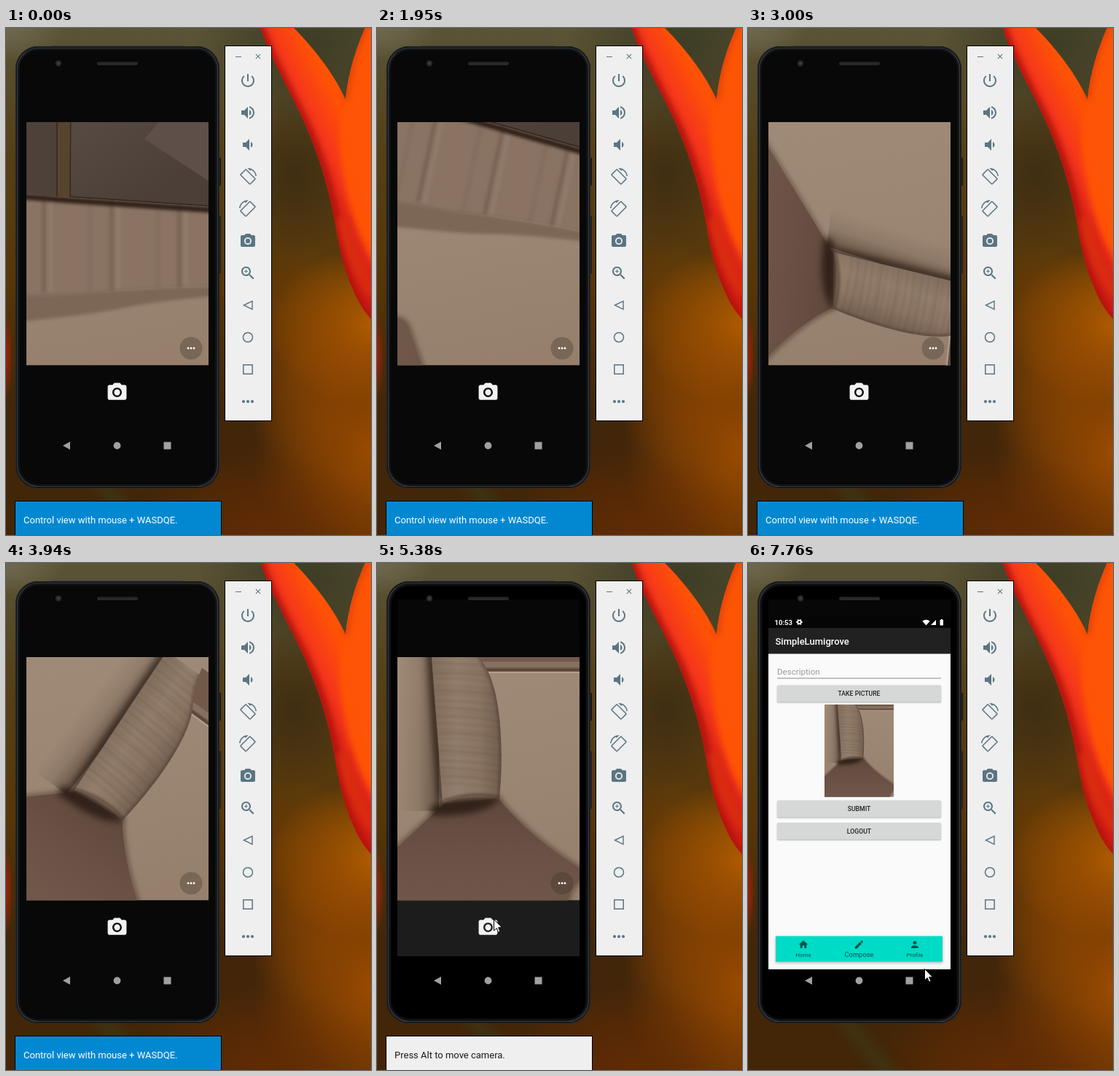
An HTML page with a canvas for the animation above (8 s loop, 501 by 695 pixels).

```html
<!DOCTYPE html>
<html lang="en">
<head>
<meta charset="utf-8">
<title>Emulator camera</title>
<style>
html, body { margin: 0; width: 100%; height: 100%; overflow: hidden; background: #3a2a10; }
canvas { display: block; }
</style>
</head>
<body>
<canvas id="stage" width="501" height="695"></canvas>
<script>
const W = 501, H = 695, LOOP = 8000, STEP = 130;
const VIEW = { x: 28, y: 129, w: 250, h: 333.5 };
const ALT_OFF = 4680, SHUTTER = 5670, CAPTURED = 5850, REVIEW = 6110, APP = 7000;
const main = document.getElementById('stage').getContext('2d');
let ctx = main;

const ICON = {
  power: 'M13 3h-2v10h2V3zm4.83 2.17l-1.42 1.42C17.99 7.86 19 9.81 19 12c0 3.87-3.13 7-7 7s-7-3.13-7-7c0-2.19 1.01-4.14 2.58-5.42L6.17 5.17C4.23 6.82 3 9.26 3 12c0 4.97 4.03 9 9 9s9-4.03 9-9c0-2.74-1.23-5.18-3.17-6.83z',
  louder: 'M3 9v6h4l5 5V4L7 9H3zm13.5 3c0-1.77-1.02-3.29-2.5-4.03v8.05c1.48-.73 2.5-2.25 2.5-4.02zM14 3.23v2.06c2.89.86 5 3.54 5 6.71s-2.11 5.85-5 6.71v2.06c4.01-.91 7-4.49 7-8.77s-2.99-7.86-7-8.77z',
  quieter: 'M18.5 12c0-1.77-1.02-3.29-2.5-4.03v8.05c1.48-.73 2.5-2.25 2.5-4.02zM5 9v6h4l5 5V4L9 9H5z',
  rotate: 'M16.48 2.52c3.27 1.55 5.61 4.72 5.97 8.48h1.5C23.44 4.84 18.29 0 12 0l-.66.03 3.81 3.81 1.33-1.32zm-6.25-.77c-.59-.59-1.54-.59-2.12 0L1.75 8.11c-.59.59-.59 1.54 0 2.12l12.02 12.02c.59.59 1.54.59 2.12 0l6.36-6.36c.59-.59.59-1.54 0-2.12L10.23 1.75zm4.6 19.44L2.81 9.17l6.36-6.36 12.02 12.02-6.36 6.36z',
  camera: 'M12 8.8a3.2 3.2 0 1 0 0 6.4a3.2 3.2 0 1 0 0-6.4zM9 2L7.17 4H4c-1.1 0-2 .9-2 2v12c0 1.1.9 2 2 2h16c1.1 0 2-.9 2-2V6c0-1.1-.9-2-2-2h-3.17L15 2H9zm3 15c-2.76 0-5-2.24-5-5s2.24-5 5-5 5 2.24 5 5-2.24 5-5 5z',
  zoom: 'M15.5 14h-.79l-.28-.27C15.41 12.59 16 11.11 16 9.5 16 5.91 13.09 3 9.5 3S3 5.91 3 9.5 5.91 16 9.5 16c1.61 0 3.09-.59 4.23-1.57l.27.28v.79l5 4.99L20.49 19l-4.99-5zm-6 0C7.01 14 5 11.99 5 9.5S7.01 5 9.5 5 14 7.01 14 9.5 11.99 14 9.5 14zM12 10h-2v2H9v-2H7V9h2V7h1v2h2v1z',
  home: 'M10 20v-6h4v6h5v-8h3L12 3 2 12h3v8z',
  edit: 'M3 17.25V21h3.75L17.81 9.94l-3.75-3.75L3 17.25zM20.71 7.04c.39-.39.39-1.02 0-1.41l-2.34-2.34c-.39-.39-1.02-.39-1.41 0l-1.83 1.83 3.75 3.75 1.83-1.83z',
  person: 'M12 12c2.21 0 4-1.79 4-4s-1.79-4-4-4-4 1.79-4 4 1.79 4 4 4zm0 2c-2.67 0-8 1.34-8 4v2h16v-2c0-2.66-5.33-4-8-4z',
  undo: 'M8 4L3 9l5 5v-4h7c2 0 3.5 1.3 3.5 3.2S17 16.500 15 16.500H6v2h9c3.300 0 5.500-2.300 5.500-5.300S18.300 8 15 8H8z',
  check: 'M9 16.17L4.83 12l-1.42 1.41L9 19 21 7l-1.41-1.41z',
  close: 'M19 6.41L17.59 5 12 10.59 6.41 5 5 6.41 10.59 12 5 17.59 6.41 19 12 13.41 17.59 19 19 17.59 13.41 12z'
};
for (const k in ICON) ICON[k] = new Path2D(ICON[k]);

// ---- helpers ----
const mix = (a, b, f) => a + (b - a) * f;

// Interpolates every field of a list of timed keys.
function track(keys, t) {
  const i = Math.max(0, keys.findLastIndex(k => k.t <= t));
  const a = keys[i], b = keys[i + 1] || a;
  const f = a === b ? 0 : ((t - a.t) / (b.t - a.t)) ** (a.ease || 1);
  return Object.fromEntries(Object.keys(a).map(k => [k, mix(a[k], b[k], f)]));
}
function icon(name, x, y, size, color, flip = 1) {
  ctx.save();
  ctx.translate(x, y);
  ctx.scale(flip * size / 24, size / 24);
  ctx.translate(-12, -12);
  ctx.fillStyle = color;
  ctx.fill(ICON[name], 'evenodd');
  ctx.restore();
}
function rect(x, y, w, h, color) { ctx.fillStyle = color; ctx.fillRect(x, y, w, h); }
function box(x, y, w, h, r, fill) { ctx.beginPath(); ctx.roundRect(x, y, w, h, r); ctx.fillStyle = fill; ctx.fill(); }
function disc(x, y, r, color) {
  ctx.fillStyle = color;
  ctx.beginPath(); ctx.arc(x, y, r, 0, 7); ctx.fill();
}
function dots(x, y, gap, r, color) { for (const d of [-gap, 0, gap]) disc(x + d, y, r, color); }
function fill(path, color) { ctx.fillStyle = color; ctx.fill(new Path2D(path)); }
function stroke(path, color, width) {
  ctx.strokeStyle = color; ctx.lineWidth = width;
  ctx.stroke(new Path2D(path));
}
function text(s, x, y, size, color, weight = 400, align = 'left') {
  ctx.font = `${weight} ${size}px Roboto, sans-serif`;
  ctx.textAlign = align;
  ctx.fillStyle = color;
  ctx.fillText(s, x, y);
}
function ramp(x0, y0, x1, y1, ...stops) {
  const g = ctx.createLinearGradient(x0, y0, x1, y1);
  stops.forEach((c, i) => g.addColorStop(i / (stops.length - 1), c));
  return g;
}
function glow(x, y, rx, ry, rgb, alpha) {
  ctx.save();
  ctx.translate(x, y); ctx.scale(rx, ry);
  const g = ctx.createRadialGradient(0, 0, 0, 0, 0, 1);
  [1, .6, 0].forEach((a, i) => g.addColorStop(i / 2, `rgba(${rgb},${alpha * a})`));
  rect(-1, -1, 2, 2, g);
  ctx.restore();
}
// Runs a drawing in its own state, optionally blurred or casting a shadow.
function layer(draw, { blur = 0, shadow, drop = 0, clip } = {}) {
  ctx.save();
  if (clip) ctx.clip(clip);
  if (shadow) { ctx.shadowColor = 'rgba(0,0,0,.3)'; ctx.shadowBlur = shadow; ctx.shadowOffsetY = drop; }
  if (blur) ctx.filter = `blur(${blur}px)`;
  draw();
  ctx.restore();
}

// ---- desktop ----
function wallpaper() {
  rect(0, 0, W, H, ramp(0, 0, 0, H, '#5a5438', '#553f16', '#573608', '#42260a', '#432607'));
  glow(0, 0, 80, 45, '125,118,95', .6);
  glow(420, 20, 160, 130, '60,60,36', .95);
  glow(395, 200, 90, 110, '58,42,18', .8);
  glow(0, 450, 9, 60, '165,32,8', .9);
  glow(500, 410, 140, 110, '184,96,0', .95);
  glow(410, 450, 90, 160, '140,70,0', .6);
  glow(500, 580, 160, 210, '158,76,0', .95);
  glow(350, 690, 170, 110, '104,44,4', .8);
  layer(() => stroke('M120 610L205 715', 'rgba(62,56,24,.7)', 22), { blur: 8 });

  const petal = 'M348 -5C360 36 385 78 402 114C426 162 444 220 452 270C458 308 466 336 476 358C484 378 494 392 505 403V-5H495C482 24 470 58 466 98C452 66 424 28 390 -5Z';
  fill(petal, ramp(390, 160, 466, 120, '#d01c14', '#f4351c', '#ff5206'));
  layer(() => {
    stroke('M470 120C462 170 480 260 510 310V80Z', '#ff5404', 20);
    fill('M466 98C470 58 482 24 495 -5H510V300C476 240 462 160 466 98Z', '#fd5406');
    stroke('M345 -10C362 40 390 90 406 122C434 180 450 240 456 290C464 340 480 380 510 412', '#b2140c', 13);
    stroke('M462 260C472 310 484 335 505 365', '#d92c10', 16);
    stroke('M495 -5C478 30 468 66 466 98', '#d43c0a', 6);
  }, { blur: 4, clip: new Path2D(petal) });
}

function phoneBody() {
  box(13, 25, 280, 606, 31, '#08090a');
  ['#24272b', '#3f444a', '#1b1d20'].forEach((c, i) => {
    ctx.strokeStyle = c; ctx.lineWidth = 1.2;
    ctx.beginPath(); ctx.roundRect(13.5 + 2 * i, 25.5 + 2 * i, 279 - 4 * i, 605 - 4 * i, 31 - 2 * i); ctx.stroke();
  });
  stroke('M62 24.500H243', '#3c4045', 1);
  rect(293, 178, 2, 38, '#17191c');
  rect(293, 258, 2, 79, '#202327');
}

function toolbar() {
  const c = '#5b7583', x = 332;
  rect(300, 24, 65, 515, '#000');
  rect(301, 25, 63, 513, '#efefef');
  stroke('M315 39.500h8', c, 1);
  icon('close', 346, 39, 12, c);
  const names = ['power', 'louder', 'quieter', 'rotate', 'rotate', 'camera', 'zoom'];
  names.forEach((n, i) => icon(n, x, 72 + 44 * i, 24, c, i === 4 ? -1 : 1));
  stroke('M326.500 380L338 374.300V385.700Z', c, 1.4);
  stroke('M325.500 424a6.500 6.500 0 1 0 13 0a6.500 6.500 0 1 0 -13 0', c, 1.5);
  stroke('M325.800 461.800h12.400v12.400h-12.400z', c, 1.5);
  dots(x, 512, 6, 2.1, c);
}

// ---- camera scene ----
// The scene keeps its own coordinates; PIVOT is the middle of the cushion's lower end.
const PIVOT = { x: 129, y: 326 };
const CAMERA = [
  { t: 0, x: 182, y: 753, turn: 102, lean: 102, zoom: 1, ease: 1.4 },
  { t: 1950, x: 102, y: 648, turn: 114, lean: 114, zoom: 1 },
  { t: 2990, x: 117, y: 346, turn: 96, lean: 108, zoom: .97 },
  { t: 3900, x: 127, y: 332, turn: 36, lean: 38, zoom: 1, ease: .8 },
  { t: 4550, ...PIVOT, turn: 0, lean: 0, zoom: 1 }
];
function lens(t) {
  const { x, y, turn, lean, zoom } = track(CAMERA, t);
  const u = turn * Math.PI / 180, v = lean * Math.PI / 180;
  return new DOMMatrix([Math.cos(u), Math.sin(u), -Math.sin(v), Math.cos(v), 0, 0].map((n, i) => i < 4 ? n * zoom : [x, y][i - 4]))
    .translate(-PIVOT.x, -PIVOT.y);
}
const WALL = lens(0).inverse();
const CUSHION = 'M90 329C84 240 79 190 73 100H128C136 128 152 140 159 166C170 200 174 260 168 323C140 316 115 319 90 329Z';
const SEAT = 'M92 330L-62 474Q-74 484 -68 498L60 780H300L262 462Q268 442 283 430Q286 422 276 417Q208 374 166 322Z';

function drawWall(k) {
  fill('M-200 -300H500V352Q180 350 100 366L-200 374Z', '#8a7363');
  layer(() => {
    for (let i = -1; i < 5; i++) {
      const x = 52 + 93 * i;
      stroke(`M${x} 60V362`, 'rgba(96,76,63,.45)', 5);
      stroke(`M${x + 9} 60V362`, 'rgba(160,138,122,.3)', 7);
      stroke(`M${x - 30} 60V362`, 'rgba(108,88,75,.2)', 5);
    }
    fill('M-200 374L100 364Q180 354 500 350V352Q230 368 160 384T-200 420Z', '#7c6757');
    stroke('M-40 226L85 236L320 252', '#2e2018', 8);
  }, { blur: 2 * k });
  fill('M-60 -60H400V252L85 232L-60 220Z', '#57442f');
  fill('M-60 -60H70V231L-60 218Z', '#4d413a');
  fill('M90 -60H400V252L88 231Z', ramp(100, 129, 180, 245, '#574a42', '#4b3f38'));
  fill('M222 115L400 40V290L190 152Z', '#5e5048');
  stroke('M70 -60V231M90 -60L88 231L400 252', '#33271f', 1.5);
}

function drawSofa(k) {
  rect(30, -300, 55, 640, ramp(30, 0, 85, 0, 'rgba(70,50,38,0)', 'rgba(70,50,38,.15)', 'rgba(70,50,38,.6)'));
  fill('M125 90H330V150L140 149Z', '#725a4b');
  rect(130, 135, 200, 8, '#86705f');
  rect(130, 145, 200, 3, '#5a4539');
  stroke('M140 150H330', '#b3a08c', 2);

  layer(() => stroke(SEAT, 'rgba(66,46,36,.55)', 6), { blur: 3 * k });
  fill(SEAT, ramp(0, 325, 0, 470, '#60483c', '#6b5145', '#6f574a'));
  layer(() => {
    stroke('M72 100C78 190 82 250 88 326', 'rgba(32,22,15,.8)', 9);
    fill('M74 334Q100 318 170 322Q150 348 74 346Z', 'rgba(32,20,14,.75)');
  }, { blur: 5 * k });

  fill(CUSHION, ramp(78, 0, 173, 0, '#85705f', '#937e6c', '#8b7563', '#715d4f'));
  layer(() => {
    for (let i = 0, y = 110; y < 308; y += 7.500, i++) {
      const sag = 4 * Math.sin(1.7 * i);
      stroke(`M65 ${y - 3}Q125 ${y - 5 + sag} 180 ${y + 5}`, `rgba(74,54,42,${.13 + .06 * Math.sin(2.3 * i)})`, 3);
    }
    stroke('M88 332Q130 314 172 326', 'rgba(70,50,40,.5)', 12);
    stroke('M128 96C136 128 152 140 159 166C170 200 174 260 168 323', 'rgba(70,50,40,.35)', 7);
  }, { blur: 1.5 * k, clip: new Path2D(CUSHION) });
}

function drawScene(t, k = 1) {
  const { x, y, w, h } = VIEW, view = lens(t);
  const place = (m, draw) => layer(() => { ctx.transform(m.a, m.b, m.c, m.d, m.e, m.f); draw(k); });
  layer(() => {
    ctx.beginPath(); ctx.rect(x, y, w, h); ctx.clip();
    rect(x, y, w, h, ramp(x + 60, y, x + 120, y + h, '#9f8a77', '#9b8673', '#96806d'));
    place(view.multiply(WALL), drawWall);
    place(view, drawSofa);
  });
}

// ---- phone contents ----
function cameraApp(t) {
  rect(28, 462, 250, 77, t < ALT_OFF ? '#080808' : '#1c1c1c');
  drawScene(t);
  const bar = new Path2D();
  bar.rect(28, 462, 250, 77);
  if (t < CAPTURED) {
    disc(254, 439, 15.5, 'rgba(60,46,38,.32)');
    dots(254, 439, 4, 1.4, '#fff');
    icon('camera', 152.5, 499.5, 31, '#f2f2f2');
    if (t >= SHUTTER) layer(() => disc(156, 500, 86, 'rgba(255,255,255,.07)'), { clip: bar });
  }
  if (t >= REVIEW) {
    icon('undo', 53, 500, 19, '#eee');
    icon('check', 149, 501, 22, '#f5f5f5');
    icon('close', 252, 500.5, 20, '#f0f0f0');
  }
}

function button(label, y) {
  layer(() => box(40, y, 225, 23, 1.5, '#d6d7d7'), { shadow: 2, drop: 1 });
  text(label, 152.5, y + 14.7, 8.7, '#222', 500, 'center');
}

function statusBar() {
  rect(28, 74, 250, 15, '#050505');
  text('10:53', 36.5, 84.5, 9.5, '#fff', 700);
  disc(70.5, 81, 3.3, '#fff');
  for (let i = 0; i < 3; i++) {
    ctx.save();
    ctx.translate(70.5, 81); ctx.rotate(i * Math.PI / 3);
    rect(-4.3, -.8, 8.6, 1.6, '#fff');
    ctx.restore();
  }
  disc(70.5, 81, 1.4, '#050505');
  fill('M244.500 85.500L239.300 79.800Q244.500 75.800 249.700 79.800ZM251 85L258 78V85ZM263.500 78h1.300v-1h2v1h1.200v7.500h-4.500z', '#fff');
}

function composeApp() {
  statusBar();
  rect(28, 89, 250, 36, '#212121');
  text('SimpleLumigrove', 37.5, 112, 13, '#fff', 500);
  rect(28, 124.5, 250, 432.5, '#fafafa');
  text('Description', 40, 153.3, 11.6, '#9b9b9b');
  rect(40, 157.5, 225, 1, '#8c8c8c');
  button('TAKE PICTURE', 167.5);
  button('SUBMIT', 325.5);
  button('LOGOUT', 356);

  const k = 95 / VIEW.w;
  layer(() => {
    ctx.translate(105, 194);
    ctx.scale(k, k);
    ctx.translate(-VIEW.x, -VIEW.y);
    drawScene(LOOP, k);
  });

  layer(() => rect(38, 511.5, 229, 35, '#00dbc6'), { shadow: 4, drop: 1 });
  const dark = 'rgba(0,0,0,.62)';
  [['home', 'Home'], ['edit', 'Compose'], ['person', 'Profile']].forEach(([name, label], i) => {
    const x = 76 + 76.5 * i;
    icon(name, x, 523, 15, dark);
    text(label, x, 540.3, i === 1 ? 9.4 : 8, dark, 400, 'center');
  });
}

function screen(t) {
  box(20, 32, 266, 592, 25, t < ALT_OFF ? '#080808' : '#000');
  if (t >= ALT_OFF) rect(28, 50, 250, 78, '#070707');
  disc(72, 48.5, 4.2, '#25272a');
  disc(72, 48.5, 2, '#3a3d42');
  box(125, 46.5, 56, 4.5, 2, '#28282a');
  if (t < APP) cameraApp(t); else composeApp();
  const gray = '#a0a0a0';
  fill('M78 572.500L88 567V578Z', gray);
  disc(152.5, 572.5, 4.9, gray);
  rect(216.5, 567.5, 10, 10, gray);
}

function banner(t) {
  if (t >= APP) return;
  const held = t < ALT_OFF;
  rect(12, 648, 284, 47, '#000');
  rect(13, 649, 282, 46, held ? '#0288d1' : '#efefef');
  text(held ? 'Control view with mouse + WASDQE.' : 'Press Alt to move camera.', 24, 679, 13, held ? '#fff' : '#1a1a1a');
}

const POINTER = [
  { t: 4940, x: 153, y: 295 }, { t: 5200, x: 160, y: 488 }, { t: 6240, x: 160, y: 490 },
  { t: 6370, x: 153, y: 483 }, { t: 6760, x: 151, y: 506 }, { t: 7410, x: 242, y: 556 }
];
function pointer(t) {
  if (t < POINTER[0].t) return;
  const { x, y } = track(POINTER, t);
  const arrow = 'M.5 .5V16L4.200 12.600L6.600 18.300L9 17.200L6.600 11.700H11.500Z';
  layer(() => {
    ctx.translate(Math.round(x), Math.round(y));
    fill(arrow, '#fff');
    stroke(arrow, '#000', 1);
  });
}

const backdrop = document.createElement('canvas');
backdrop.width = W; backdrop.height = H;
ctx = backdrop.getContext('2d');
wallpaper();
phoneBody();
toolbar();
ctx = main;

const start = performance.now();
let shown = -1;
function tick() {
  const now = (performance.now() - start) % LOOP;
  const t = Math.floor(now / STEP) * STEP;
  if (t !== shown) {
    shown = t;
    ctx.drawImage(backdrop, 0, 0);
    screen(t);
    banner(t);
    pointer(t);
  }
  requestAnimationFrame(tick);
}
tick();
</script>
</body>
</html>
```
